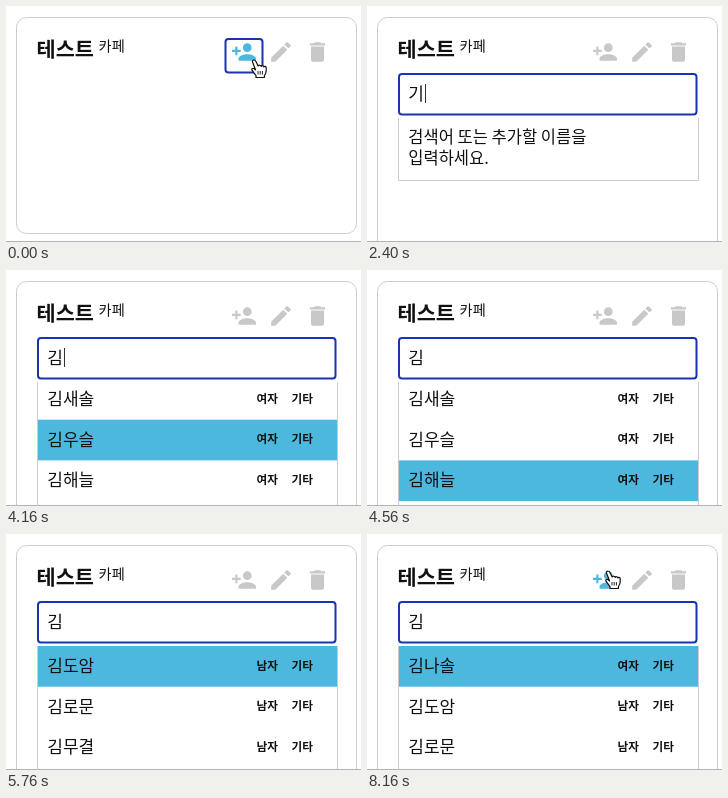
Animation of 355x236 px, one loop 8.24 s. Source, as an HTML page with a canvas:

```html
<!DOCTYPE html>
<html lang="ko">
<head>
<meta charset="utf-8">
<style>
html, body { margin: 0; width: 355px; height: 236px; overflow: hidden; background: #fff; }
canvas { display: block; }
</style>
</head>
<body>
<canvas id="stage" width="355" height="236"></canvas>
<script>
const ctx = document.getElementById('stage').getContext('2d');
const LOOP = 8240, STEP = 80;
const FONT = '"Noto Sans CJK KR", "Noto Sans CJK", "Noto Sans KR", sans-serif';
const BLUE = '#1b34ae', SKY = '#4db8de', GREY = '#c8c8c8', LINE = '#cccccc';

const OPEN = 320, FOCUS = 1600, TYPE = 2080, LIST = 2560, FIRST_UP = 4720;
const LIST_TOP = 112, ROW = 40.7, VIEW = 123;

const people = [
  ['김나솔', '여자'], ['김도암', '남자'], ['김로문', '남자'], ['김무결', '남자'],
  ['김새솔', '여자'], ['김우슬', '여자'], ['김해늘', '여자']
];
const typing = [[2160, 'ㄱ'], [2320, '기'], [2480, '김']];
const presses = [
  [3440, 1], [3600, 1], [3760, 1], [3920, 1], [4080, 1], [4400, 1],
  [FIRST_UP, -1], [5120, -1], [5280, -1], [5440, -1], [5680, -1], [6000, -1]
];

const icons = {
  add: new Path2D('M15 12c2.21 0 4-1.79 4-4s-1.79-4-4-4-4 1.79-4 4 1.79 4 4 4zm-9-2V7H4v3H1v2h3v3h2v-3h3v-2H6zm9 4c-2.67 0-8 1.34-8 4v2h16v-2c0-2.66-5.33-4-8-4z'),
  edit: new Path2D('M3 17.25V21h3.75L17.81 9.94l-3.75-3.75L3 17.25zM20.71 7.04c.39-.39.39-1.02 0-1.41l-2.34-2.34c-.39-.39-1.02-.39-1.41 0l-1.83 1.83 3.75 3.75 1.83-1.83z'),
  bin: new Path2D('M6 19c0 1.1.9 2 2 2h8c1.1 0 2-.9 2-2V7H6v12zM19 4h-3.5l-1-1h-5l-1 1H5v2h14V4z')
};
const pointers = {
  hand: new Path2D('M3 1C1.8 1 1.2 2 1.6 3.2L4.6 11 2.8 9.6C1.4 8.8.3 10 1 11.2l4 5.4V18.5h8.4v-1.8c1-1.6 1.8-3.4 1.8-5V8.6c0-1.4-1.8-1.8-2.3-.6C12.6 6.6 10.8 6.2 10.2 7.4 9.8 6 8 5.8 7.2 7L4.8 2.2C4.4 1.4 3.8 1 3 1z'),
  arrow: new Path2D('M0 0v14l3.3-3 2.2 5 2.3-1-2.2-4.8H10z')
};

function text(s, x, y, size, color = '#111', weight = 400) {
  ctx.font = `${weight} ${size}px ${FONT}`;
  ctx.fillStyle = color;
  ctx.fillText(s, x, y);
}

function box(x, y, w, h, r, color, width = 1) {
  ctx.beginPath();
  ctx.roundRect(x, y, w, h, r);
  ctx.strokeStyle = color;
  ctx.lineWidth = width;
  ctx.stroke();
}

function seg(points, color, width = 1) {
  ctx.beginPath();
  points.forEach(([x, y]) => ctx.lineTo(x, y));
  ctx.strokeStyle = color;
  ctx.lineWidth = width;
  ctx.stroke();
}

function icon(path, cx, cy, color) {
  ctx.save();
  ctx.translate(cx, cy);
  ctx.scale(1.09, 1.09);
  ctx.translate(-12, -12);
  ctx.fillStyle = color;
  ctx.fill(path);
  ctx.restore();
}

function pointerAt(t) {
  const glide = (a, b, from, to) => {
    const k = Math.min(1, Math.max(0, (t - from) / (to - from)));
    const e = k * k * (3 - 2 * k);
    return [a[0] + (b[0] - a[0]) * e, a[1] + (b[1] - a[1]) * e];
  };
  if (t < 1200) return glide([248, 54], [193, 76], 480, 1200);
  if (t < TYPE) return glide([193, 76], [180, 88], 1200, 1520);
  if (t >= 7600) return glide([252, -18], [241, 37], 7600, 8160);
  return null;
}

const overButton = p => p && p[0] > 219 && p[0] < 257 && p[1] > 32 && p[1] < 67;

function drawPointer([x, y], t) {
  ctx.save();
  ctx.translate(x, y);
  ctx.lineJoin = 'round';
  if (overButton([x, y])) {
    ctx.translate(-3, -1);
    ctx.fillStyle = '#fff';
    ctx.fill(pointers.hand);
    ctx.strokeStyle = '#111';
    ctx.lineWidth = 1.2;
    ctx.stroke(pointers.hand);
    for (const k of [7, 9.2, 11.4]) seg([[k, 12], [k, 15.5]], '#111', 0.9);
  } else if (t >= OPEN && y > 66) {
    const beam = [[-3, -7.5], [-1, -7.5], [0, -6.5], [0, 6.5], [-1, 7.5], [-3, 7.5]];
    const tips = [[3, -7.5], [1, -7.5], [0, -6.5], [0, 6.5], [1, 7.5], [3, 7.5]];
    seg(beam, '#222');
    seg(tips, '#222');
  } else {
    ctx.strokeStyle = '#fff';
    ctx.lineWidth = 2;
    ctx.stroke(pointers.arrow);
    ctx.fillStyle = '#111';
    ctx.fill(pointers.arrow);
  }
  ctx.restore();
}

// Replays the arrow keys: below the view centres the row, above aligns its top.
function listState(t) {
  let index = 0, scroll = 0;
  for (const [at, dir] of presses) {
    if (t < at) break;
    index += dir;
    const top = index * ROW;
    if (top + ROW > scroll + VIEW) scroll = top - ROW + 3;
    if (top < scroll) scroll = top;
  }
  return { index, scroll: Math.min(scroll, 4 * ROW + 3) };
}

function drawList(t) {
  const { index, scroll } = listState(t);
  ctx.save();
  ctx.beginPath();
  ctx.rect(31, LIST_TOP, 301, 124);
  ctx.clip();
  people.forEach(([name, sex], i) => {
    const y = LIST_TOP + i * ROW - scroll;
    if (i === index) {
      ctx.fillStyle = SKY;
      ctx.fillRect(31, y, 300, ROW);
    }
    text(name, 41.3, y + 26, 17);
    text(sex, 250.5, y + 23.6, 11.6, '#111', 700);
    text('기타', 285.5, y + 23.6, 11.6, '#111', 700);
  });
  seg([[31.5, LIST_TOP], [31.5, 236]], LINE);
  seg([[331.5, LIST_TOP], [331.5, 236]], LINE);
  if (t < 3440) {
    ctx.fillStyle = '#777';
    ctx.beginPath();
    ctx.arc(325.5, 234, 3.5, 0, 7);
    ctx.fill();
  }
  ctx.restore();
}

function drawHint() {
  seg([[31.5, LIST_TOP], [31.5, 174.5], [331.5, 174.5], [331.5, LIST_TOP]], LINE);
  text('검색어 또는 추가할 이름을', 41.3, 137.3, 16.5);
  text('입력하세요.', 41.3, 158.3, 16.5);
}

function caretOn(t) {
  if (t < 2720) return true;
  const start = t < FIRST_UP ? 2720 : t < 6000 ? FIRST_UP : 6000;
  return (t - start) % 1200 < 600;
}

function drawInput(t) {
  const typed = typing.reduce((s, [at, v]) => t >= at ? v : s, '');
  if (t >= FOCUS) box(32, 68, 297.5, 40.5, 3, BLUE, 2);
  else box(31.5, 67.5, 298, 41, 0, LINE);
  if (typed) text(typed, 41.3, 93.5, 17);
  else text('이름을 적고 엔터!', 41.3, 93.5, 17, '#757575');
  if (t >= FOCUS && caretOn(t)) {
    const x = typed && t < FIRST_UP ? 58 : 42;
    ctx.fillStyle = '#333';
    ctx.fillRect(x, 78, 1, 19);
  }
}

function draw(t) {
  const pointer = pointerAt(t);
  ctx.fillStyle = '#fff';
  ctx.fillRect(0, 0, 355, 236);
  box(10.5, 11.5, 340, t < OPEN ? 216 : 300, 10, LINE);
  text('테스트', 30.5, 50.6, 20.8, '#111', 700);
  text('카페', 92.6, 44.6, 14.2);
  icon(icons.add, 238, 46, overButton(pointer) ? SKY : GREY);
  icon(icons.edit, 275, 46, GREY);
  icon(icons.bin, 311.5, 46, GREY);
  if (t < FOCUS) box(219.5, 33, 37, 33.5, 3, BLUE, 2);
  if (t >= OPEN) {
    drawInput(t);
    if (t < LIST) drawHint();
    else drawList(t);
  }
  seg([[0, 235.5], [355, 235.5]], '#b4b4b4');
  if (pointer) drawPointer(pointer, t);
}

const begin = performance.now();
function tick() {
  const t = (performance.now() - begin) % LOOP;
  draw(Math.floor(t / STEP) * STEP);
  requestAnimationFrame(tick);
}
tick();
</script>
</body>
</html>
```
